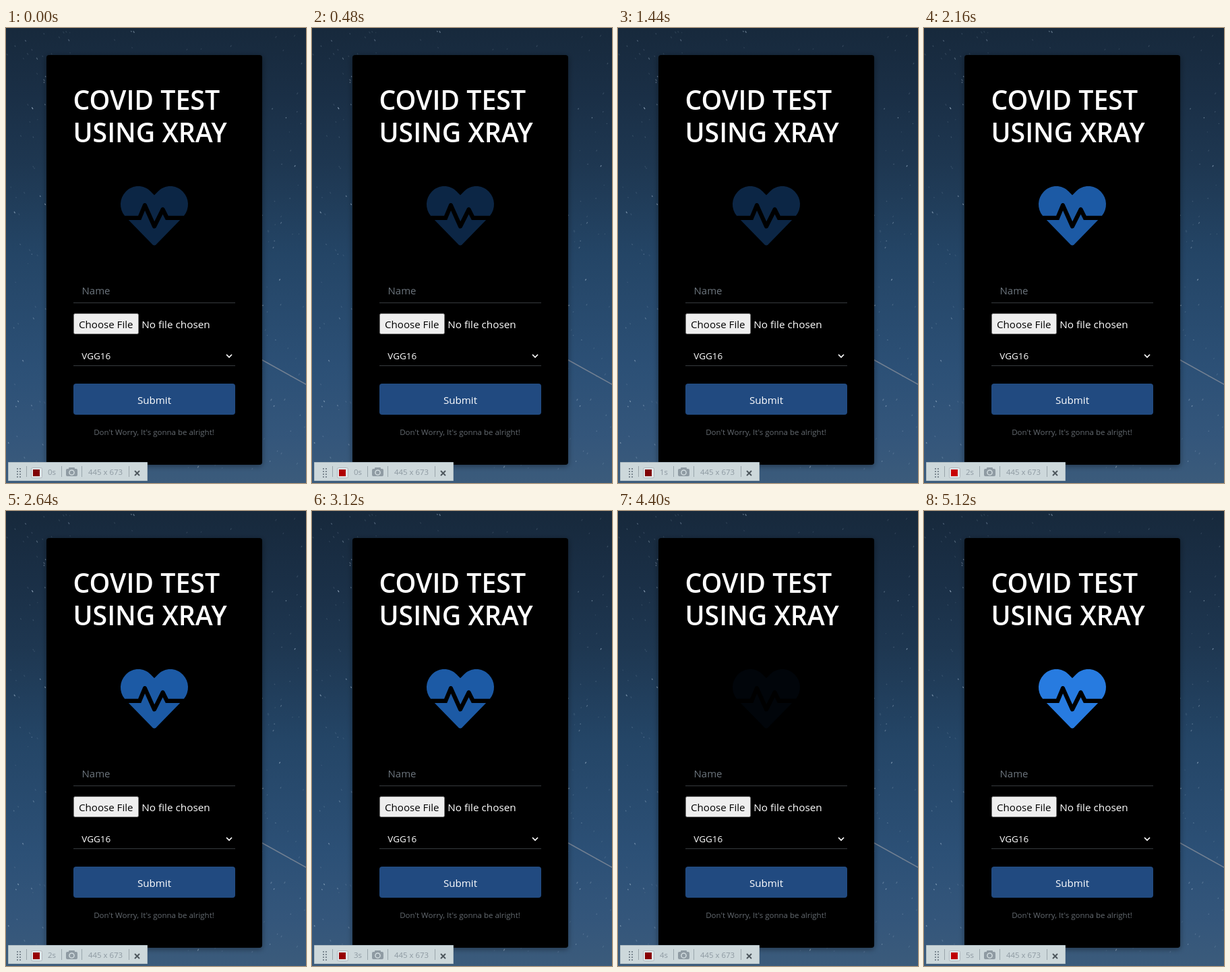
An HTML page with a canvas for the animation above (5200 ms loop, 445x673 px).

```html
<!DOCTYPE html>
<html lang="en">
<head>
<meta charset="utf-8">
<title>Covid test form</title>
<style>
  html, body { margin: 0; width: 100%; height: 100%; overflow: hidden; background: #1b2c42; }
  canvas { display: block; width: 445px; height: 673px; }
</style>
</head>
<body>
<canvas id="stage" width="445" height="673"></canvas>
<script>
const W = 445, H = 673, LOOP = 5200, STEP = 80;
const ctx = document.getElementById('stage').getContext('2d');
const FONT = '"Open Sans", "Noto Sans", sans-serif';

const heart = new Path2D(
  'M320.2 243.8l-49.7 99.4c-6 12.1-23.4 11.7-28.9-.6l-56.9-126.3-30 71.7H60.6' +
  'l182.5 186.5c7.1 7.3 18.6 7.3 25.7 0L451.4 288H342.3z' +
  'M473.7 73.9l-2.4-2.5c-51.5-52.6-135.8-52.6-187.4 0L256 100l-27.9-28.5' +
  'c-51.5-52.7-135.9-52.7-187.4 0l-2.4 2.4C-10.4 123.7-12.5 203 31 256h102.4' +
  'l35.9-86.2c5.4-12.9 23.6-13.2 29.4-.4l58.2 129.3 49-97.9' +
  'c5.9-11.8 22.7-11.8 28.6 0l27.6 55.2H481c43.5-53 41.4-132.3-7.3-182.1z');

function seeded(seed) {
  return () => (seed = (seed * 16807) % 2147483647) / 2147483647;
}

function box(x, y, w, h, r, fill, stroke) {
  ctx.beginPath();
  ctx.roundRect(x, y, w, h, r);
  if (fill) { ctx.fillStyle = fill; ctx.fill(); }
  if (stroke) { ctx.lineWidth = 1; ctx.strokeStyle = stroke; ctx.stroke(); }
}

function line(points, color, width = 1) {
  ctx.beginPath();
  points.forEach(([x, y]) => ctx.lineTo(x, y));
  ctx.lineWidth = width;
  ctx.strokeStyle = color;
  ctx.stroke();
}

function text(str, x, y, size, color, { weight = 400, align = 'left' } = {}) {
  ctx.font = `${weight} ${size}px ${FONT}`;
  ctx.textAlign = align;
  ctx.fillStyle = color;
  ctx.fillText(str, x, y);
}

function drawSky() {
  const sky = ctx.createLinearGradient(0, 0, 0, H);
  sky.addColorStop(0, '#17293c');
  sky.addColorStop(0.15, '#1a2f46');
  sky.addColorStop(0.3, '#1e3751');
  sky.addColorStop(0.5, '#244566');
  sky.addColorStop(0.75, '#2c5076');
  sky.addColorStop(0.9, '#34567b');
  sky.addColorStop(1, '#3b5b7b');
  ctx.fillStyle = sky;
  ctx.fillRect(0, 0, W, H);

  const rnd = seeded(4127);
  for (let i = 0; i < 330; i++) {
    const x = rnd() * W, y = rnd() * H * 0.97;
    const len = 1 + rnd() * 1.8, glow = 0.14 + rnd() ** 3 * 0.6;
    const lean = x < W / 2 ? 0.6 : -0.6;
    line([[x, y], [x + lean * len, y + len]], `rgba(175,195,215,${glow})`, 1.2);
  }
  line([[370, 485.5], [445, 527]], 'rgba(160,160,165,.6)', 1.5);
}

function drawForm() {
  ctx.save();
  ctx.shadowColor = 'rgba(0,0,0,.4)';
  ctx.shadowBlur = 9;
  ctx.shadowOffsetY = 2;
  box(60, 40, 320, 606, 4, '#000');
  ctx.restore();

  text('COVID TEST', 99.5, 121, 39.2, '#fff', { weight: 600 });
  text('USING XRAY', 99.5, 169, 39.2, '#fff', { weight: 600 });

  text('Name', 112.5, 393.5, 15, '#6c757d');
  line([[100, 406.5], [340, 406.5]], '#363a3e');

  box(100.5, 422.5, 96, 30, 2, '#efefef', '#767676');
  text('Choose File', 108, 444, 15.1, '#000');
  text('No file chosen', 201.3, 444, 15.3, '#fff', { weight: 500 });

  text('VGG16', 112.3, 490, 13.5, '#fff', { weight: 500 });
  line([[327, 483], [331, 487], [335, 483]], '#fff', 1.7);
  line([[100, 499.5], [340, 499.5]], '#363a3e');

  box(100, 526, 240, 46, 4, '#214a80');
  text('Submit', 220, 555.5, 15.1, '#fff', { weight: 500, align: 'center' });
  text("Don't Worry, It's gonna be alright!", 219.5, 602, 11.5, '#646a70', { align: 'center' });
}

function drawHeart(opacity) {
  ctx.save();
  ctx.globalAlpha = opacity;
  ctx.translate(170, 227.8);
  ctx.scale(100 / 512, 100 / 512);
  ctx.fillStyle = '#2980ea';
  ctx.fill(heart);
  ctx.restore();
}

function drawCamera() {
  const body = '#8f9ba3';
  box(89, 652, 17, 11, 2, body);
  box(93, 650, 9, 4, 1, body);
  ctx.beginPath();
  ctx.arc(97.5, 657.5, 3.6, 0, Math.PI * 2);
  ctx.lineWidth = 1.5;
  ctx.strokeStyle = '#d3dde0';
  ctx.stroke();
}

function drawRecorder(seconds, red) {
  box(3.5, 642.5, 206, 27, 0, '#cdd8db', '#adbbc2');
  ctx.fillStyle = '#7b8790';
  for (let row = 0; row < 4; row++) {
    ctx.fillRect(16, 651 + row * 4, 2, 2);
    ctx.fillRect(20, 651 + row * 4, 2, 2);
  }
  [30.5, 82.5, 112.5, 182.5].forEach(x => line([[x, 648], [x, 664]], '#9aa6ac'));

  box(37.5, 650.5, 16, 15, 2, '#e0e7ea', '#b0b9be');
  box(40, 653, 10, 10, 0, `rgb(${red},0,4)`);
  text(seconds + 's', 62, 660.5, 11.5, '#8d99a1');
  drawCamera();
  text('445 x 673', 122, 660.5, 11.4, '#8d99a1');
  line([[191, 655], [198, 662]], '#4d575d', 2);
  line([[198, 655], [191, 662]], '#4d575d', 2);
}

// Triangle wave from 0 to 1 and back, lowest at phase 0.
function triangle(phase) {
  const p = ((phase % 1) + 1) % 1;
  return 1 - Math.abs(2 * p - 1);
}

function draw(tick) {
  drawSky();
  drawForm();
  drawHeart(triangle((tick - 0.88) / 6));
  drawRecorder(Math.floor(tick / 12), Math.round(128 + 72 * triangle(tick / 18)));
}

const start = performance.now();
let shown = -1;

function play() {
  const tick = Math.floor(((performance.now() - start) % LOOP) / STEP);
  if (tick !== shown) {
    shown = tick;
    draw(tick);
  }
  requestAnimationFrame(play);
}
play();
</script>
</body>
</html>
```
